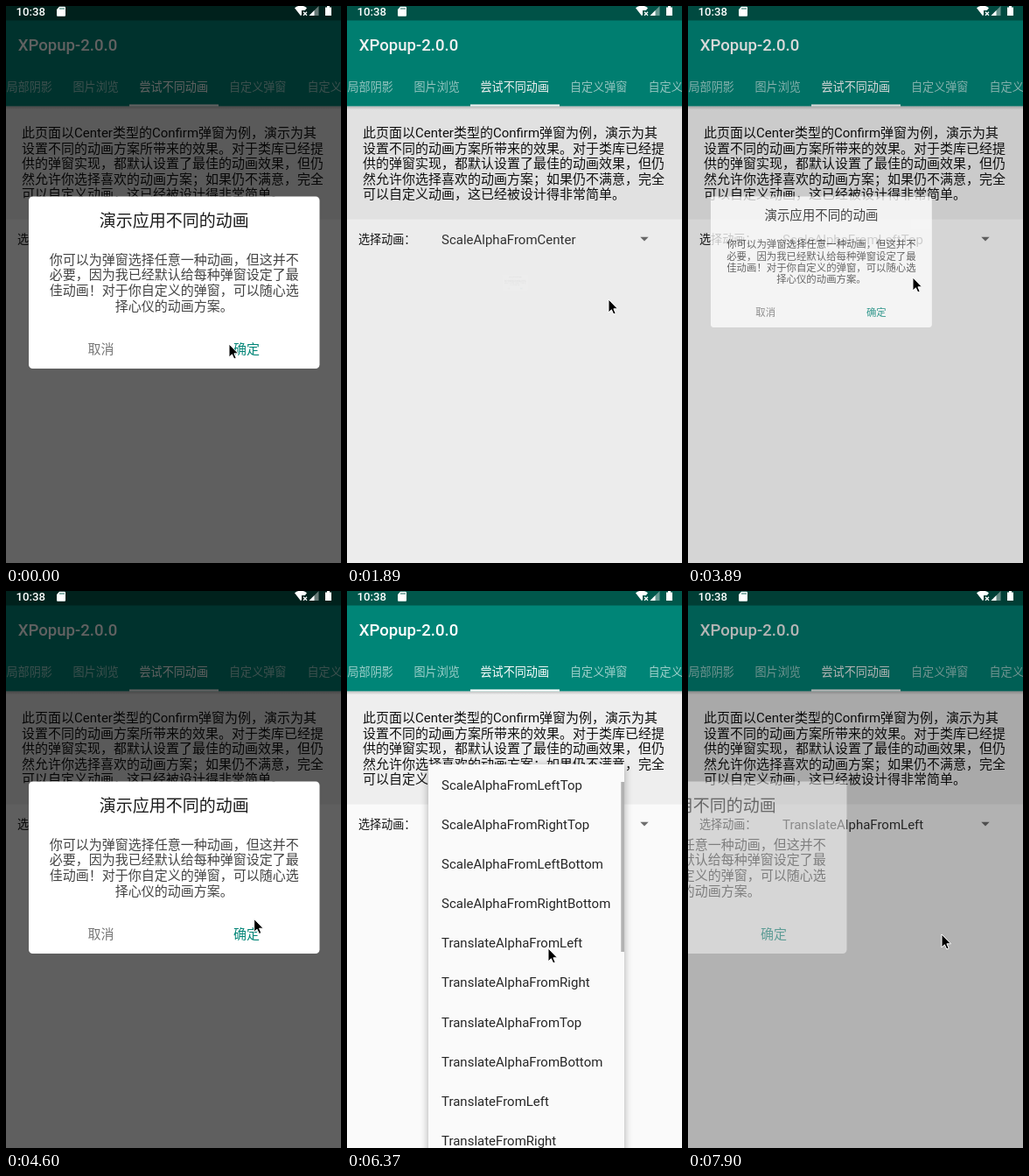
Animation, 383 px wide and 636 px high, one loop 8000 ms. Source, as an HTML page:

```html
<!DOCTYPE html>
<html lang="zh-CN">
<head>
<meta charset="utf-8">
<style>
html, body { margin: 0; width: 100%; height: 100%; overflow: hidden; background: #fafafa; }
svg { display: block; }
text { font-family: Roboto, "Noto Sans CJK SC", "Noto Sans CJK", sans-serif; font-size: 15px; white-space: pre; }
.small text { font-size: 13.1px; }
.tabs { fill: #fff; fill-opacity: .62; }
.tabs .on { fill-opacity: 1; }
.bold { font-weight: 500; fill: #fff; }
#dialog text { text-anchor: middle; }
#menu { filter: drop-shadow(0 2px 5px rgba(0, 0, 0, .32)); }
</style>
</head>
<body>
<svg width="383" height="636" viewBox="0 0 383 636">
  <defs>
    <linearGradient id="shade" x2="0" y2="1">
      <stop stop-opacity=".2"/><stop offset="1" stop-opacity="0"/>
    </linearGradient>
  </defs>
  <rect width="383" height="636" fill="#fafafa"/>
  <rect y="114" width="383" height="129.5" fill="#eee"/>
  <rect y="114.4" width="383" height="4" fill="url(#shade)"/>
  <rect width="383" height="114.4" fill="#008577"/>
  <rect width="383" height="16.5" fill="#00574b"/>
  <text x="13.7" y="50.5" class="bold" style="font-size:18.6px">XPopup-2.0.0</text>
  <g class="small tabs">
    <text x="0.5" y="97">局部阴影</text>
    <text x="76.5" y="97">图片浏览</text>
    <text x="152.5" y="97" class="on">尝试不同动画</text>
    <text x="255" y="97">自定义弹窗</text>
    <text x="344.5" y="97">自定义动画</text>
  </g>
  <rect x="141" y="112.4" width="102" height="2.2" fill="#fff"/>
  <g id="intro" fill="#111"></g>
  <g class="small"><text x="13" y="271" fill="#111">选择动画：</text></g>
  <text id="choice" x="108" y="271.7" fill="#333"></text>
  <path d="M335.3 263.8h9.4l-4.7 4.8z" fill="#6e6e6e"/>

  <g id="menu">
    <rect x="93" y="198" width="224" height="460" fill="#fafafa"/>
    <svg x="93" y="198" width="224" height="438"><g id="items" fill="#262626"></g></svg>
    <rect id="thumb" x="313.3" width="3.7" height="194" fill="#b2b2b2"/>
  </g>

  <rect id="scrim" width="383" height="636"/>
  <g id="dialog">
    <rect x="26" y="217.5" width="332.5" height="196.5" rx="4.5" fill="#fff"/>
    <text x="192.3" y="252" fill="#1c1c1c" style="font-size:19px">演示应用不同的动画</text>
    <g id="message" fill="#444"></g>
    <text x="108.5" y="396.5" fill="#777">取消</text>
    <text x="275" y="396.5" fill="#008577">确定</text>
  </g>

  <g fill="#fff">
    <text x="11.5" y="11" class="bold" style="font-size:13.2px">10:38</text>
    <path d="M61 .8h6q1 0 1 1v9q0 1-1 1h-8q-1 0-1-1V4z"/>
    <path d="M62 2v2M64 2v2M66 2v2" stroke="#00574b" stroke-width=".9"/>
    <path d="M330 2.2Q337-3 344 2.2L341.8 5H338V10L337 11.2z"/>
    <path d="M340 6.8l4 4m0-4l-4 4" stroke="#fff" stroke-width="1.3"/>
    <path d="M346.5 11L357.5 0V11z" opacity=".4"/>
    <path d="M346.5 11L352.5 5V11z"/>
    <path d="M365 1.5h2V0h3v1.5h2V11h-7z"/>
  </g>
  <path id="cursor" d="M0 0V15L3.4 11.8 5.8 17 8.2 16 5.9 10.8H10.5Z" stroke="#fff"/>
</svg>

<script>
const LOOP = 8000, STEP = 117.95, FADE = 360, SCRIM_LAG = 8, ROW = 45.15;
const el = id => document.getElementById(id);
const set = (id, name, value) => el(id).setAttribute(name, value);
const ramp = (t, start, length) => Math.min(1, Math.max(0, (t - start) / length));
const smooth = u => u * u * (3 - 2 * u);
const overshoot = x => 1 + (1 - x) ** 2 * (2 * x - 1);

// cubic-bezier(.4, 0, .2, 1), solved by bisection
function ease(x) {
  let u = .5;
  for (let d = .25; d > 1e-6; d /= 2) {
    const v = 1 - u;
    u += 1.2 * v * v * u + .6 * v * u * u + u ** 3 < x ? d : -d;
  }
  return smooth(u);
}

function addLines(id, lines, x, y, gap) {
  el(id).innerHTML = lines.map((s, i) => `<text x="${x}" y="${y + i * gap}">${s}</text>`).join('');
}

const sides = ['Left', 'Right', 'Top', 'Bottom'];
const corners = ['Top', 'Bottom'].flatMap(v => ['Left', 'Right'].map(h => h + v));
const names = [
  ...['Center', ...corners].map(s => 'ScaleAlphaFrom' + s),
  ...sides.map(s => 'TranslateAlphaFrom' + s),
  ...sides.map(s => 'TranslateFrom' + s),
];
addLines('items', names, 15, 28.7, ROW);
addLines('intro', [
  '此页面以Center类型的Confirm弹窗为例，演示为其',
  '设置不同的动画方案所带来的效果。对于类库已经提',
  '供的弹窗实现，都默认设置了最佳的动画效果，但仍',
  '然允许你选择喜欢的动画方案；如果仍不满意，完全',
  '可以自定义动画，这已经被设计得非常简单。'], 18, 150, 17.5);
addLines('message', [
  '你可以为弹窗选择任意一种动画，但这并不',
  '必要，因为我已经默认给每种弹窗设定了最',
  '佳动画！对于你自定义的弹窗，可以随心选',
  '择心仪的动画方案。'], 192.3, 294.8, 17.6);

const scaleAt = (x, y) => k => `translate(${x} ${y}) scale(${k}) translate(${-x} ${-y})`;
const slideLeft = k => `translate(${(k - 1) * 333} 0)`;

const popups = [
  { show: -FADE * 2, hide: 1652, curve: overshoot, pose: scaleAt(192.3, 315.8) },
  { show: 3794, hide: 4924, curve: overshoot, pose: scaleAt(26, 217.5) },
  { show: 6971, hide: 7772, curve: ease, pose: slideLeft },
];
// The list opens with the chosen name on top
const menus = [
  { open: 2400, close: 3450, chosen: 0 },
  { open: 5700, close: 6620, chosen: 1 },
];
// Pointer stops: time, x, y
const stops = [
  [0, 255, 386], [1500, 259, 392], [1890, 299, 335], [2400, 258, 265], [3400, 247, 266],
  [3890, 257, 310], [4300, 283, 366], [4800, 284, 379], [5070, 271, 249], [5650, 262, 266],
  [6370, 230, 408], [7190, 274, 360], [7540, 290, 392], [LOOP, 290, 392],
];

function drawPopup(t) {
  const popup = popups.find(p => t < p.hide + FADE);
  if (!popup) return;
  const { show, hide, curve, pose } = popup;
  const left = 1 - ease(ramp(t, hide, FADE));
  const size = curve(ramp(t, show, FADE)) * left;
  set('dialog', 'transform', pose(size));
  set('dialog', 'opacity', Math.min(1, size));
  set('scrim', 'opacity', .62 * ease(ramp(t, show + SCRIM_LAG, FADE)) * left);
}

function drawMenu(t) {
  const current = menus.find(m => t < m.close + 160);
  const { open, close, chosen } = current || menus[1];
  set('menu', 'opacity', ramp(t, open, 220) * (1 - ramp(t, close, 160)));
  set('items', 'transform', `translate(0 ${-chosen * ROW})`);
  set('thumb', 'y', 198 + chosen * 20);
  const picked = menus.filter(m => t >= m.close).length;
  el('choice').textContent = names[[0, 1, 5][picked]];
}

function drawPointer(t) {
  const i = stops.findIndex(s => s[0] > t);
  const [t0, x0, y0] = stops[i - 1], [t1, x1, y1] = stops[i];
  const k = smooth(ramp(t, t0, t1 - t0));
  set('cursor', 'transform', `translate(${x0 + (x1 - x0) * k} ${y0 + (y1 - y0) * k})`);
}

// The screen refreshes in even steps of about 118 ms
function tick() {
  const t = Math.floor(performance.now() % LOOP / STEP + .06) * STEP;
  drawPopup(t);
  drawMenu(t);
  drawPointer(Math.min(t, LOOP - 1));
  requestAnimationFrame(tick);
}
tick();
</script>
</body>
</html>
```
